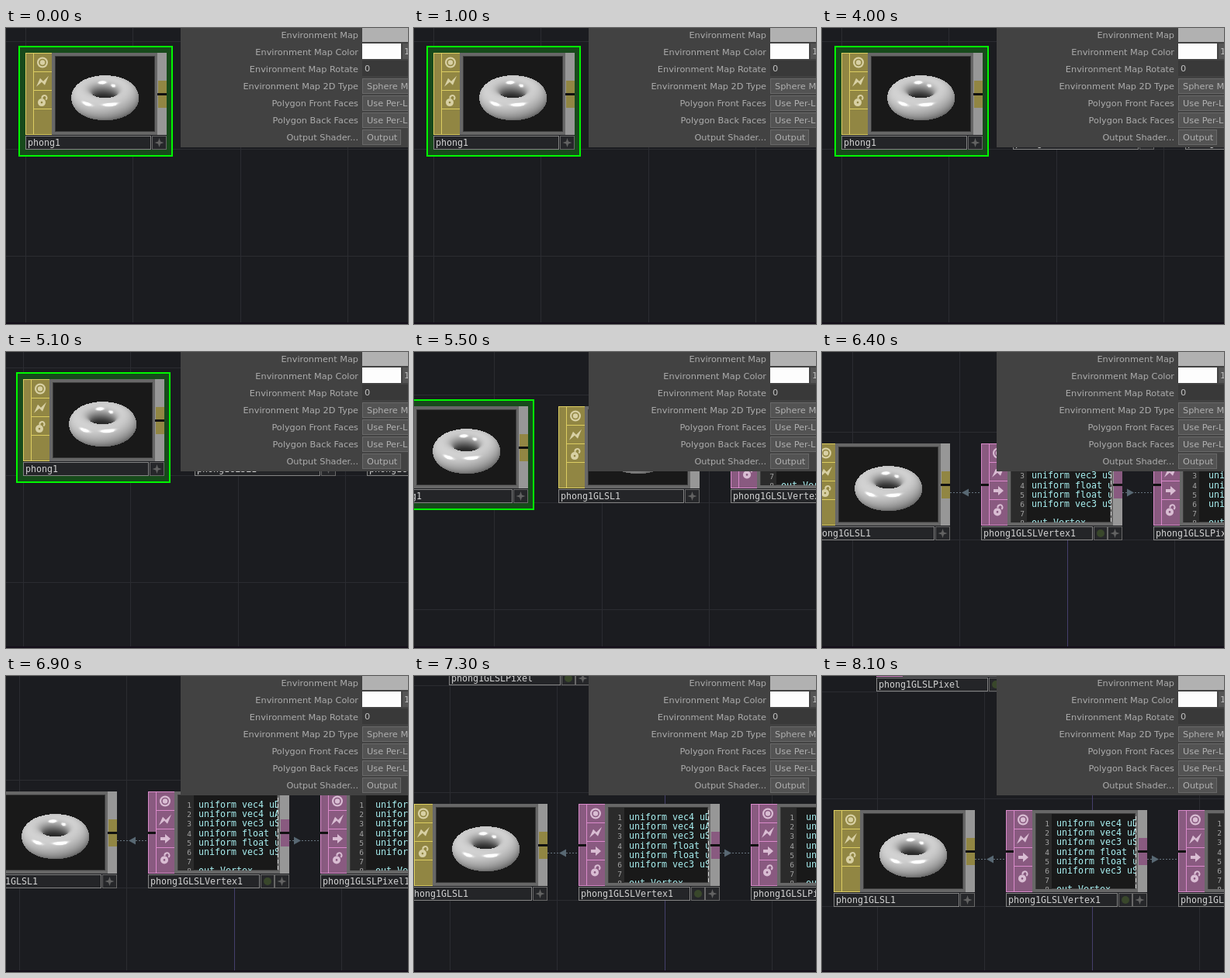
These frames come from a looping animation (518x382 px, 8500 ms). An HTML page with a canvas:

```html
<!DOCTYPE html>
<html lang="en">
<head>
<meta charset="utf-8">
<title>Shader network</title>
<style>
html, body { margin: 0; width: 100%; height: 100%; overflow: hidden; background: #1b1c20; }
canvas { display: block; }
</style>
</head>
<body>
<canvas id="stage" width="518" height="382"></canvas>
<script>
const W = 518, H = 382, LOOP = 8500, STEP = 100;
const ctx = document.getElementById('stage').getContext('2d');
const MONO = '11.63px "DejaVu Sans Mono", monospace';
const SANS = '11.3px "DejaVu Sans", sans-serif';
const YELLOW = { fill: '#918643', line: '#dccd62', icon: '#d8d0a4' };
const PURPLE = { fill: '#895a80', line: '#d98aca', icon: '#d9bdd3' };

const CODE = [
  'uniform vec4 uDiffuseColor;', 'uniform vec4 uAmbientColor;',
  'uniform vec3 uSpecularColor;', 'uniform float uShininess;',
  'uniform float uShadowStrength;', 'uniform vec3 uShadowColor;',
  '', 'out Vertex'
];

const NODES = [
  { name: 'phong1', x: 25, y: 32, selected: true },
  { name: 'phong1GLSL1', x: 246, y: 32 },
  { name: 'phong1GLSLVertex1', x: 468, y: 32, codeX: 65 },
  { name: 'phong1GLSLPixel1', x: 690, y: 32, codeX: 71 },
  { name: 'phong1GLSLPixel', x: 301, y: -246, codeX: 71 }
];

// Pan of the network view: time, x, y
const PAN = [[5000, 0, 0], [5500, -60, 38], [6400, -263, 86], [6900, -285, 117], [7700, -231, 141]];

function rect(x, y, w, h, color) {
  ctx.fillStyle = color;
  ctx.fillRect(x, y, w, h);
}

function frame(x, y, w, h, fill, line) {
  rect(x, y, w, h, line);
  rect(x + 1, y + 1, w - 2, h - 2, fill);
}

function text(str, x, y, color, font, align = 'left') {
  ctx.font = font;
  ctx.fillStyle = color;
  ctx.textAlign = align;
  ctx.fillText(str, x, y);
}

function shape(points, color) {
  ctx.beginPath();
  points.forEach(([x, y]) => ctx.lineTo(x, y));
  ctx.closePath();
  ctx.fillStyle = color;
  ctx.fill();
}

function disc(x, y, r, color) {
  ctx.beginPath();
  ctx.arc(x, y, r, 0, 7);
  ctx.fillStyle = color;
  ctx.fill();
}

function at(x, y, draw) {
  ctx.save();
  ctx.translate(x, y);
  draw();
  ctx.restore();
}

// Catmull-Rom through PAN, at rest at both ends
function pan(t) {
  const last = PAN.length - 1;
  if (t <= PAN[0][0]) return [0, 0];
  if (t >= PAN[last][0]) return PAN[last].slice(1);
  const i = PAN.findIndex(p => p[0] > t) - 1;
  const a = PAN[i], b = PAN[i + 1], d = b[0] - a[0], u = (t - a[0]) / d;
  const slope = (k, axis) => k === 0 || k === last ? 0 :
    (PAN[k + 1][axis] - PAN[k - 1][axis]) / (PAN[k + 1][0] - PAN[k - 1][0]);
  return [1, 2].map(axis => Math.round(
    a[axis] + (b[axis] - a[axis]) * u * u * (3 - 2 * u) +
    d * u * (1 - u) * ((1 - u) * slope(i, axis) - u * slope(i + 1, axis))));
}

// Ray-marched torus, seen from 30 degrees above
function renderTorus() {
  const S = 3, w = 127 * S, h = 96 * S, R = 29, r = 14.5, sin = 0.5, cos = Math.sqrt(0.75);
  const lights = [[-0.755, 0.633, 0.18], [0.2, 0.96, 0.26]];
  const halves = [[-0.44, 0.66, 0.61], [0.11, 0.79, 0.61]];
  const dot = (a, b) => a[0] * b[0] + a[1] * b[1] + a[2] * b[2];
  const canvas = document.createElement('canvas');
  canvas.width = w;
  canvas.height = h;
  const c = canvas.getContext('2d'), image = c.createImageData(w, h);
  for (let py = 0; py < h; py++) for (let px = 0; px < w; px++) {
    const x = px / S - 63.5, up = 53 - py / S;
    let value = 25;
    for (let depth = 50, i = 0; i < 60 && depth > -50; i++) {
      const y = up * cos + depth * sin, z = depth * cos - up * sin;
      const ring = Math.hypot(x, z), dist = Math.hypot(ring - R, y) - r;
      if (dist < 0.05) {
        const out = (ring - R) / r, n = [x / ring * out, y / r, z / ring * out];
        value = 60;
        lights.forEach(l => value += 80 * (0.5 + 0.5 * dot(n, l)));
        value *= 1 - 0.5 * Math.max(0, -out) * (1 - n[1]);
        halves.forEach(l => value += 110 * Math.max(0, dot(n, l)) ** 160);
        break;
      }
      depth -= dist;
    }
    image.data.set([value, value, value, 255], (py * w + px) * 4);
  }
  c.putImageData(image, 0, 0);
  return canvas;
}
const torus = renderTorus();

const ICONS = {
  target(color) {
    disc(0, 0, 7, color.icon);
    disc(0, 0, 4.8, color.fill);
    disc(0, 0, 3.2, color.icon);
  },
  bolt(color) {
    shape([[-8, 7], [-3, -4], [1, 0], [8, -7], [3, 5], [-1, 1]], color.icon);
  },
  arrow(color) {
    shape([[-6, -2], [0, -2], [0, -6], [7, 0], [0, 6], [0, 2], [-6, 2]], color.icon);
  },
  lock(color) {
    disc(-1, 3, 5, color.icon);
    disc(-1, 3, 1.3, color.fill);
    ctx.beginPath();
    ctx.arc(2.5, -3, 3, Math.PI * 0.9, Math.PI * 2.3);
    ctx.lineWidth = 2;
    ctx.strokeStyle = color.icon;
    ctx.stroke();
  }
};

function drawCode(codeX) {
  ctx.beginPath();
  ctx.rect(39, 5, 128, 97);
  ctx.save();
  ctx.clip();
  rect(39, 5, 20, 97, '#2b2b2b');
  CODE.forEach((line, i) => {
    const y = 21 + i * 12.2;
    text(i + 1, 56, y, '#a5a5a5', '9.5px "DejaVu Sans Mono", monospace', 'right');
    text(line, codeX, y, '#a9f1f2', MONO);
  });
  ctx.restore();
  for (let y = 8; y < 100; y += 8) rect(167, y, 1, 5, '#d8d8d8');
}

function drawNode({ name, selected, codeX }) {
  const color = codeX ? PURPLE : YELLOW;
  if (selected) {
    rect(-9, -9, 199, 143, '#00f800');
    rect(-7, -7, 195, 139, '#174a1b');
  }
  rect(0, 0, 182, 125, '#1b1c20');
  frame(0, 0, 11, 106, color.fill, color.line);
  if (codeX) rect(0, 52, 10, 3, '#111');
  frame(10, 0, 25, 106, color.fill, color.line);
  const icons = codeX ? ['target', 'bolt', 'arrow', 'lock'] : ['target', 'bolt', 'lock'];
  icons.forEach((icon, i) => {
    at(22, 12.5 + i * 24.3, () => ICONS[icon](color));
    if (i < 3) rect(11, 24 * (i + 1), 23, 1, color.line);
  });

  rect(34, 0, 136, 106, '#676767');
  rect(38, 4, 129, 98, '#3b3b3b');
  rect(39, 5, 127, 96, '#191919');
  if (codeX) drawCode(codeX);
  else ctx.drawImage(torus, 39, 5, 127, 96);

  rect(170, 0, 12, 106, '#979797');
  rect(171, 36, 11, 16, color.fill);
  rect(170, 52, 12, 3, '#111');
  rect(171, 55, 11, 16, color.fill);

  const labelWidth = codeX ? 144 : 162;
  frame(0, 107, labelWidth, 18, '#242528', '#858585');
  text(name, 3, 120, '#d2d2d2', MONO);
  if (codeX) {
    frame(145, 107, 18, 18, '#26272a', '#686868');
    disc(154, 116, 5, '#39472b');
  }
  frame(163, 107, 19, 18, '#26272a', '#686868');
  shape([[172.5, 110], [174, 114.5], [178.5, 116], [174, 117.5], [172.5, 122],
    [171, 117.5], [166.5, 116], [171, 114.5]], '#626262');
}

// Dotted connection with an arrow head; dir is -1 for left, 1 for right
function drawWire(x, arrowX, dir) {
  for (let i = 0; i < 41; i += 4) rect(x + i, 95, 2, 1, '#66737e');
  shape([[arrowX + 5 * dir, 95.5], [arrowX - 4 * dir, 90.5], [arrowX - 4 * dir, 100.5]], '#586873');
}

function drawNetwork(t) {
  const [dx, dy] = pan(t), gap = 138.5;
  rect(0, 0, W, H, '#1b1c20');
  for (let i = -6; i < 6; i++) {
    rect(Math.floor(579 + dx + i * gap), 0, 1, H, '#2b2c31');
    rect(0, Math.floor(156 + dy + i * gap), W, 1, '#2b2c31');
  }
  rect(579 + dx, 0, 1, H, '#453f6b');
  at(dx, dy, () => {
    const shown = t < 4000 ? NODES.slice(0, 1) : NODES;
    if (t >= 4000) {
      drawWire(428, 448, -1);
      drawWire(650, 660, 1);
    }
    shown.forEach(node => at(node.x, node.y, () => drawNode(node)));
  });
  rect(0, 380, W, 2, '#130d19');
}

function drawButton(label, y, width, lit) {
  frame(459, y - 10, width, 20, lit ? '#606060' : '#535353', '#686868');
  text(label, 465, y + 4, '#b0b0b0', SANS);
}

function drawPanel(hovered) {
  rect(225, 0, W - 225, 154, '#424242');
  const labels = ['Environment Map', 'Environment Map Color', 'Environment Map Rotate',
    'Environment Map 2D Type', 'Polygon Front Faces', 'Polygon Back Faces', 'Output Shader...'];
  labels.forEach((label, i) => {
    const y = 9 + i * 22, lit = i === hovered;
    text(label, 454, y + 4, lit ? '#c4c4c4' : '#acacac', SANS, 'right');
    if (lit) {
      rect(231, y - 1, 12, 2, '#aaa');
      rect(236, y - 6, 2, 12, '#aaa');
    }
  });
  rect(459, 0, 59, 18, '#b1b1b1');
  rect(459, 20, 50, 20, '#fdfdfd');
  rect(511, 20, 7, 20, '#555');
  text('1', 513, 34, '#c0c0c0', SANS);
  rect(459, 42, 59, 20, '#393939');
  text('0', 462, 56, '#c0c0c0', SANS);
  drawButton('Sphere Map', 75, 90, hovered === 3);
  drawButton('Use Per-Light', 97, 90, hovered === 4);
  drawButton('Use Per-Light', 119, 90, hovered === 5);
  drawButton('Output', 141, 50, hovered === 6);
}

function cursorAt(t) {
  const step = t / STEP;
  if (step >= 1 && step < 9) {
    const u = Math.min(1, (step - 1) / 5), ease = 1 - (1 - u) ** 2;
    return [506 - 28 * ease, step < 7 ? 87 + 54 * ease : 140];
  }
  return { 9: [470, 118], 46: [6, 182], 77: [180, 23], 80: [484, 14] }[step];
}

function drawCursor() {
  const outline = [[0, 0], [0, 17], [4, 13.5], [6.5, 19], [9.5, 18], [7, 12.5], [12, 12]];
  const inside = [[1, 2.5], [1, 14.6], [4.3, 11.8], [7, 17.6], [8.2, 17.1], [5.6, 11.4], [9.6, 11.2]];
  shape(outline, '#000');
  shape(inside, '#fff');
}

function draw(now) {
  const t = Math.floor(now % LOOP / STEP) * STEP;
  const cursor = cursorAt(t);
  const overPanel = cursor && cursor[0] > 225 && cursor[1] < 154;
  drawNetwork(t);
  drawPanel(overPanel ? Math.round((cursor[1] - 9) / 22) : -1);
  if (cursor) at(Math.round(cursor[0]), Math.round(cursor[1]), drawCursor);
}

let start;
function tick(now) {
  start ??= now;
  draw(now - start);
  requestAnimationFrame(tick);
}
draw(0);
requestAnimationFrame(tick);
</script>
</body>
</html>
```
